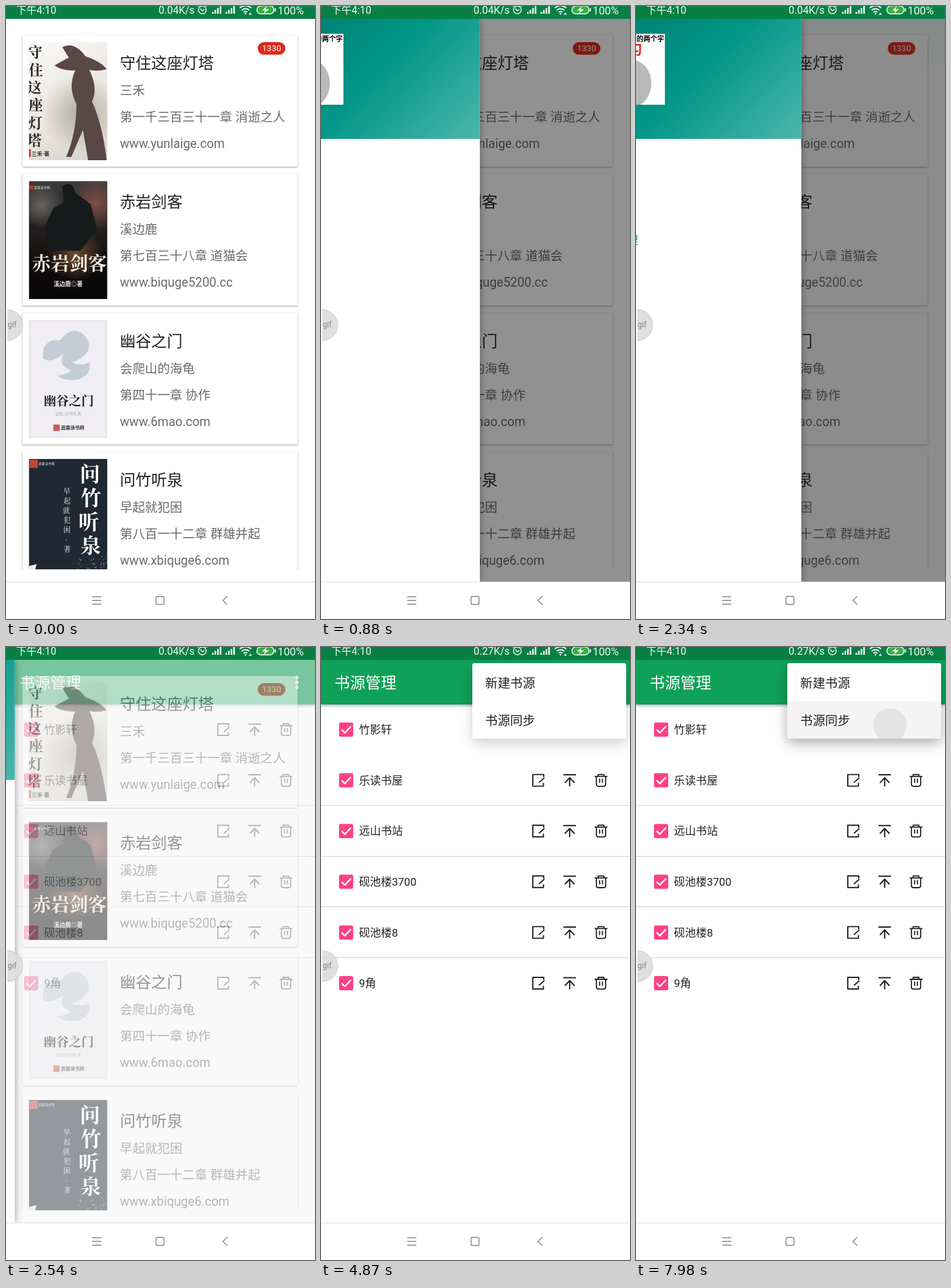
These frames come from a looping animation (480 by 950 pixels, 8 s). An HTML page with a canvas:

```html
<!DOCTYPE html>
<html lang="zh-CN">
<head>
<meta charset="utf-8">
<title>书架</title>
<style>
html, body { margin: 0; width: 100%; height: 100%; overflow: hidden; background: #fff; }
canvas { display: block; width: 100vw; height: 100vh; }
</style>
</head>
<body>
<canvas id="stage" width="480" height="950"></canvas>
<script>
const W = 480, H = 950, LOOP = 8000, DRAWER = 342;
const SANS = 'Roboto, "Noto Sans CJK SC", "Noto Sans CJK", sans-serif';
const SERIF = '"Noto Serif CJK SC", "Noto Serif", "Noto Sans CJK SC", serif';
const GREEN = '#10a158', DARK = '#212121', GREY = '#6a6a6a';

const beats = [0, 480, 580, 680, 780, 860, 940, 1030, 1230, 1960, 2160, 2340, 2440, 2540, 2620, 2720,
  4140, 4240, 4320, 4410, 4500, 4600, 4690, 4780, 4870, 4970, 5060, 5160, 6020, 7590, 7820, 7900, 7980];

const books = [
  { title: '守住这座灯塔', author: '三禾', chapter: '第一千三百三十一章 消逝之人', url: 'www.yunlaige.com', cover: lampCover },
  { title: '赤岩剑客', author: '溪边鹿', chapter: '第七百三十八章 道猫会', url: 'www.biquge5200.cc', cover: swordCover },
  { title: '幽谷之门', author: '会爬山的海龟', chapter: '第四十一章 协作', url: 'www.6mao.com', cover: valleyCover },
  { title: '问竹听泉', author: '早起就犯困', chapter: '第八百一十二章 群雄并起', url: 'www.xbiquge6.com', cover: bambooCover }
];
const sources = ['竹影轩', '乐读书屋', '远山书站', '砚池楼3700', '砚池楼8', '9角'];
const SHOP = '晨露读书网';

const screen = document.getElementById('stage').getContext('2d');
const layer = document.createElement('canvas');
layer.width = W;
layer.height = H;
const offscreen = layer.getContext('2d');
let g = screen;

const clamp = v => Math.min(1, Math.max(0, v));
const span = (t, a, b) => clamp((t - a) / (b - a));
const smooth = u => u * u * (3 - 2 * u);
const easeOut = u => 1 - (1 - u) ** 2;

function rect(x, y, w, h, fill) {
  g.fillStyle = fill;
  g.fillRect(x, y, w, h);
}

function round(x, y, w, h, r, fill) {
  g.beginPath();
  g.roundRect(x, y, w, h, r);
  g.fillStyle = fill;
  g.fill();
}

function disc(x, y, r, fill, ry = r) {
  g.beginPath();
  g.ellipse(x, y, r, ry, 0, 0, 7);
  g.fillStyle = fill;
  g.fill();
}

function shape(d, fill) {
  g.fillStyle = fill;
  g.fill(new Path2D(d));
}

function stroke(d, color, width) {
  g.strokeStyle = color;
  g.lineWidth = width;
  g.stroke(new Path2D(d));
}

function text(s, x, cy, size, color, { align = 'left', weight = 400, font = SANS } = {}) {
  g.font = `${weight} ${size}px ${font}`;
  g.textAlign = align;
  g.fillStyle = color;
  g.fillText(s, x, cy + size * 0.37);
}

function column(s, x, y, pitch, size, color, weight = 700) {
  [...s].forEach((c, i) =>
    text(c, x + Math.sin(i * 2.3) * size * 0.06, y + i * pitch, size, color, { align: 'center', weight, font: SERIF }));
}

function gradient(x0, y0, x1, y1, ...colors) {
  const fill = g.createLinearGradient(x0, y0, x1, y1);
  colors.forEach((c, i) => fill.addColorStop(i / (colors.length - 1), c));
  return fill;
}

function glow(x, y, r, color) {
  const fill = g.createRadialGradient(x, y, 0, x, y, r);
  fill.addColorStop(0, color);
  fill.addColorStop(1, color.slice(0, 7) + '00');
  rect(x - r, y - r, 2 * r, 2 * r, fill);
}

function shadow(color, blur, dy) {
  g.shadowColor = color;
  g.shadowBlur = blur;
  g.shadowOffsetY = dy;
}

function clipped(x, y, w, h, draw) {
  g.save();
  g.beginPath();
  g.rect(x, y, w, h);
  g.clip();
  draw();
  g.restore();
}

function blended(alpha, draw) {
  if (!alpha) return;
  g = offscreen;
  g.clearRect(0, 0, W, H);
  draw();
  g = screen;
  g.globalAlpha = alpha;
  g.drawImage(layer, 0, 0);
  g.globalAlpha = 1;
}

// Covers are drawn in a 122 x 183 box.
function lampCover(book) {
  rect(0, 0, 122, 183, gradient(0, 0, 122, 183, '#fbfaf8', '#ece8e2', '#d6d2ca'));
  glow(80, 110, 60, '#a39d8ecc');
  shape('M52 8 Q70 -2 88 22 Q112 30 121 42 Q106 46 94 43 Q108 72 98 92 Q114 126 121 183 H92 L84 136 L66 178 H58 Q74 140 74 96 Q60 70 72 44 Q50 44 40 36 Q54 28 62 24 Z', '#5a4849');
  column(book.title, 10, 15, 27.4, 22, '#222');
  rect(0, 166, 3, 12, '#c83a32');
  text(book.author + '·著', 4, 173, 8.5, '#333', { weight: 700 });
}

function swordCover(book) {
  rect(0, 0, 122, 183, gradient(0, 0, 0, 183, '#3b3a3b', '#272424', '#120e0d', '#060606'));
  glow(104, 34, 42, '#8d5348dd');
  glow(20, 38, 34, '#75746ecc');
  glow(72, 112, 44, '#7f5230dd');
  shape('M52 8 Q68 -2 72 18 L96 36 L106 76 L80 108 H34 L24 72 L38 42 L54 34 Z', '#171a1b');
  rect(1, 7, 6, 6, '#c5352c');
  text(SHOP, 8, 10, 5, '#ddd');
  text(book.title, 63, 128, 29, '#f3eee4', { align: 'center', weight: 900, font: SERIF });
  text(book.author + '◎著', 61, 159, 9, '#eee', { align: 'center', weight: 700 });
}

function valleyCover(book) {
  rect(0, 0, 122, 183, '#e9e6ed');
  rect(3, 3, 116, 177, '#f0eef3');
  shape('M22 46 Q30 28 48 32 Q64 12 78 18 Q98 30 92 48 Q82 62 66 66 Q82 72 94 66 Q98 84 78 92 Q56 96 44 86 Q60 84 66 78 Q44 72 54 52 Q36 68 22 60 Z', '#c4cdd5');
  text(book.title, 62, 125, 19.5, '#222', { align: 'center', weight: 700, font: SERIF });
  text(book.author + ' 著', 61, 145, 5.5, '#aaa', { align: 'center' });
  rect(38, 162, 10, 10, '#cc5a55');
  text(SHOP, 50, 167, 7.2, '#333', { weight: 700 });
}

function bambooCover(book) {
  rect(0, 0, 122, 183, '#202833');
  let seed = 7;
  const random = () => (seed = seed * 16807 % 2147483647) / 2147483647;
  for (let i = 0; i < 70; i++) {
    disc(122 - 50 * random() ** 1.5, 175 - 24 * random() ** 2, 0.4 + random() * 0.6, '#77818c');
  }
  shape('M0 171 V166 L12 163 L10 171 Z', '#eee');
  rect(1, 1, 13, 13, '#c0453f');
  text(SHOP, 15, 7, 5, '#ddd');
  column(book.title, 95, 23, 37, 32, '#fff');
  column(book.author + '·著', 59, 50, 15, 11, '#eee', 500);
}

function drawShelf() {
  clipped(0, 20, W, 853, () => books.forEach((book, i) => {
    const y = 45 + i * 215.3;
    g.save();
    shadow('rgba(0,0,0,.38)', 3, 1);
    round(25.5, y, 427.5, 204, 2, '#fff');
    g.restore();
    g.save();
    g.translate(35.5, y + 11);
    clipped(0, 0, 122, 183, () => book.cover(book));
    g.restore();
    text(book.title, 177, y + 43, 24.3, DARK);
    text(book.author, 177, y + 86, 19.4, GREY);
    text(book.chapter, 177, y + 127, 19.4, GREY);
    text(book.url, 177, y + 168, 19.4, GREY);
  }));
  round(391, 56, 43, 19.5, 10, '#dc2a1c');
  text('1330', 412.5, 65.5, 13.2, '#fff', { align: 'center' });
}

function drawSourceRow(name, i) {
  const y = 128 + i * 78.6;
  round(28, y - 11, 22, 22, 2.5, '#ff4085');
  text(name, 59, y, 17, DARK);
  g.save();
  g.translate(0, y);
  g.lineJoin = 'round';
  stroke('M32 0 L37 5 L46.5 -5', '#fff', 2.4);
  stroke('M346 -5 V-9 H329 V9 H345.5 V4 M338.5 3.5 L347 -4', DARK, 1.9);
  stroke('M376.5 -8.5 H396 M386.3 9.5 V-3 M378.8 4 L386.3 -4 L393.8 4', DARK, 2);
  stroke('M425 -6 H445 M430.5 -6 V-9 H439.5 V-6 M427.8 -6 V6 Q427.8 9.2 431 9.2 H439 Q442.2 9.2 442.2 6 V-6 M432.8 -2.5 V4 M437.2 -2.5 V4', DARK, 1.8);
  g.restore();
}

function drawSources(t) {
  g.save();
  shadow('rgba(0,0,0,.35)', 4, 2);
  rect(0, 20, W, 69, GREEN);
  g.restore();
  text('书源管理', 21, 55.5, 24, '#fff');
  const tap = span(t, 4140, 4410);
  if (tap > 0 && t < 4690) disc(452, 55, 26 * tap, 'rgba(255,255,255,.2)');
  [47.2, 54.8, 62.2].forEach(y => disc(452, y, 2.5, '#fff'));
  sources.forEach(drawSourceRow);
  for (let i = 0; i < 4; i++) rect(0, 245 + Math.round(i * 78.7), W, 1, '#d2d2d2');
}

function drawPopup(t) {
  const open = easeOut(span(t, 4420, 4880));
  if (!open) return;
  const w = 239 * (0.35 + 0.65 * open), h = 117 * open, x = 474 - w;
  g.save();
  g.globalAlpha = clamp(open * 1.6);
  g.save();
  shadow(`rgba(0,0,0,${0.32 * span(t, 4420, 5160)})`, 20, 7);
  round(x, 25, w, h, 3, '#fff');
  g.restore();
  clipped(x, 25, w, h, () => {
    const press = span(t, 7740, 7980);
    if (press) {
      rect(235, 83.5, 239, 59, `rgba(0,0,0,${0.045 * press})`);
      disc(394.5, 121, 26 * smooth(press), 'rgba(0,0,0,.065)');
    }
    text('新建书源', 255, 55.5, 19.4, DARK);
    text('书源同步', 255, 114, 19.4, DARK);
  });
  g.restore();
}

function drawAvatar() {
  rect(20, 43, 110, 110, '#fff');
  clipped(20, 43, 110, 110, () => disc(80, 120, 29, '#b9b9b9', 36));
  text('生命中最美丽的两个字', 75, 51, 10.8, '#000', { align: 'center', weight: 700 });
  text('学习', 75, 68, 19.5, '#e8120c', { align: 'center', weight: 900 });
}

function drawDrawer(open, t) {
  if (open <= 0) return;
  rect(0, 20, W, 872, `rgba(0,0,0,${0.6 * open})`);
  clipped(0, 20, W, 872, () => {
    g.translate(DRAWER * (open - 1), 0);
    g.save();
    g.shadowColor = 'rgba(0,0,0,.4)';
    g.shadowBlur = 10;
    rect(0, 20, DRAWER, 872, '#fff');
    g.restore();
    rect(0, 20, DRAWER, 186, gradient(39, -19, 303, 245, '#00796b', '#009688', '#4db6ac'));
    drawAvatar();
    text('Hello', 20, 175, 17, '#fff');
    const closing = t >= 2340;
    if (t >= 1960 && !closing) {
      clipped(0, 333, DRAWER, 59, () => {
        rect(0, 333, DRAWER, 59, 'rgba(0,0,0,.05)');
        disc(130, 362, 40 + 260 * span(t, 1960, 2160), 'rgba(0,0,0,.06)');
      });
    }
    const chosen = closing ? 2 : 0;
    ['书架', '搜索', '书源管理', '关于'].forEach((s, i) =>
      text(s, 20, 245.5 + i * 58.7, 17.1, i === chosen ? GREEN : DARK));
  });
}

function drawStatus(t) {
  rect(0, 0, W, 20, '#088045');
  const ink = '#f2faf5';
  text('下午4:10', 16, 6.5, 15.8, ink);
  text(t < 4320 ? '0.04K/s' : '0.27K/s', 237, 6.5, 16, ink);
  stroke('M311 6 A6 6 0 1 1 299 6 A6 6 0 1 1 311 6 M302 4 L305 7.5 L308.5 5 M298 1 L300.5 -1 M312 1 L309.5 -1', ink, 1.4);
  for (const x of [320, 341]) {
    for (let i = 0; i < 4; i++) rect(x + i * 4, 9 - i * 3, 2.5, 3 + i * 3, ink);
  }
  stroke('M363 3 Q372 -4 381 3 M366 6.5 Q372 2 378 6.5 M369 9.5 Q372 7.5 375 9.5', ink, 1.8);
  disc(372, 12, 1.3, ink);
  const busy = t >= 6020 && t < 7590;
  shape(busy ? 'M377 10 H382 L379.5 13.5 Z' : 'M377 13.5 H382 L379.5 10 Z', ink);
  round(389, -1, 28, 14, 7, ink);
  round(390.5, 0.5, 25, 11, 5.5, '#35b044');
  rect(417.5, 3.5, 1.8, 5, ink);
  shape('M405 0.5 L398 7 H402.5 L400.5 12 L408.5 5 H403.5 Z', '#fff');
  text('100%', 422, 6.5, 16.8, ink);
}

function drawSystem(t) {
  drawStatus(t);
  rect(0, 892, W, 58, '#fff');
  rect(0, 892, W, 1, '#dcdcdc');
  stroke('M134 915.5 H148 M134 921.3 H148 M134 927 H148', '#858585', 1.4);
  g.beginPath();
  g.roundRect(233, 915, 12.5, 12.5, 2.5);
  g.stroke();
  stroke('M344 914.5 L337 921.3 L344 928', '#858585', 1.4);
  clipped(2, 465, 30, 60, () => {
    disc(2, 494.5, 24, 'rgba(222,222,222,.94)');
    stroke('M2 470.5 A24 24 0 0 1 2 518.5', '#cacaca', 1);
    text('gif', 2.5, 494, 12, '#858585');
  });
}

function drawerAt(t) {
  if (t < 1230) return smooth(span(t, 475, 1065));
  return 1 - easeOut(span(t, 2300, 2600));
}

function draw(now) {
  const time = now % LOOP;
  const t = beats.findLast(b => b <= time) ?? 0;
  const fade = span(t, 2320, 2720);
  rect(0, 0, W, H, '#fff');
  // The outgoing shelf fades on top of the incoming page.
  blended(fade, () => drawSources(t));
  blended(1 - fade, drawShelf);
  drawDrawer(drawerAt(t), t);
  drawSystem(t);
  drawPopup(t);
}

const start = performance.now();
function tick() {
  draw(performance.now() - start);
  requestAnimationFrame(tick);
}
tick();
</script>
</body>
</html>
```
